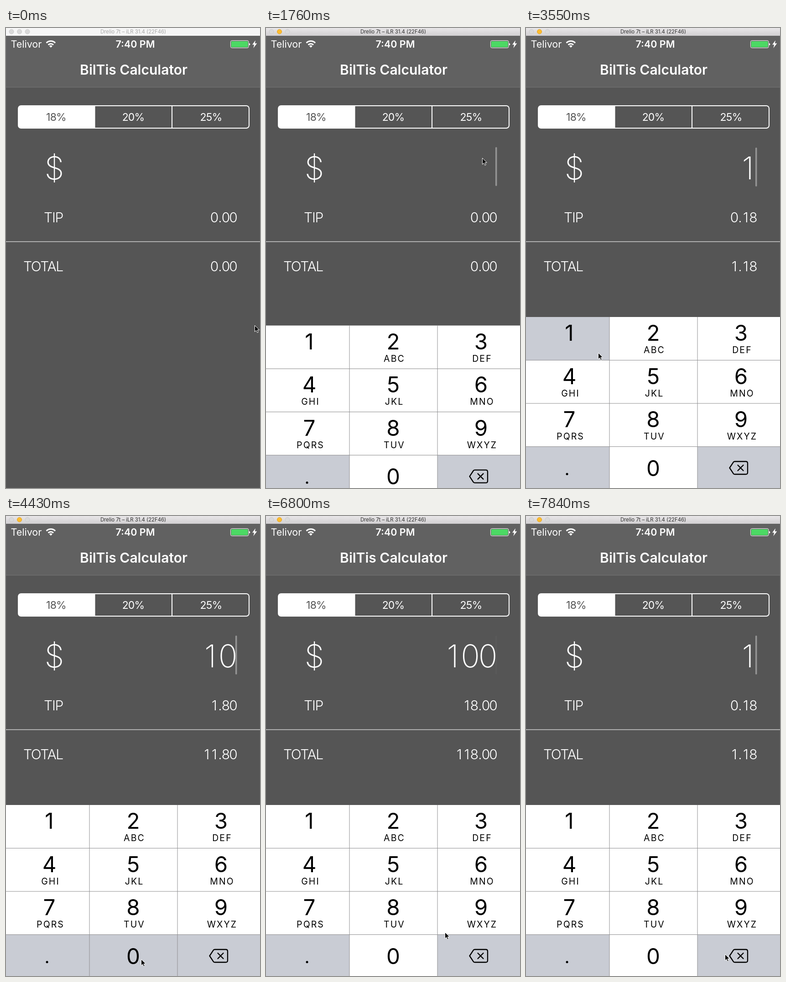
Write an HTML page that moves like this. It is 557x1006 px and loops after 8000 ms.

```html
<!DOCTYPE html>
<html lang="en">
<head>
<meta charset="utf-8">
<title>Tip calculator</title>
<style>
  html, body { margin: 0; width: 100%; height: 100%; overflow: hidden; background: #555; }
  svg { display: block; width: 100%; height: 100%; font-family: Inter, Roboto, sans-serif; }
  .mid { text-anchor: middle; }
  .end { text-anchor: end; }
  .white { fill: #fff; }
  .light { font-size: 30px; font-weight: 300; fill: #fff; }
  .label { letter-spacing: -1.3px; }
  .big { font-size: 69px; font-weight: 150; fill: #fff; }
  .digit { font-size: 47.5px; text-anchor: middle; }
  .letters { font-size: 19.5px; letter-spacing: 2.1px; text-anchor: middle; }
</style>
</head>
<body>
<svg viewBox="0 0 557 1006" preserveAspectRatio="none">
  <defs>
    <linearGradient id="chrome" x2="0" y2="1">
      <stop stop-color="#e8e6e8"/><stop offset="1" stop-color="#d1cfd1"/>
    </linearGradient>
  </defs>
  <rect width="557" height="1006" fill="#555"/>
  <rect y="17" width="557" height="112" fill="#616161"/>
  <rect y="129" width="557" height="1" fill="#757575"/>

  <rect id="bar" width="557" height="17"/>
  <g stroke-width="1">
    <circle cx="12" cy="8" r="5" fill="#d9d9d9" stroke="#cbcbcb"/>
    <circle id="amber" cx="29.5" cy="8" r="5"/>
    <circle cx="47" cy="8" r="5" fill="#d9d9d9" stroke="#cbcbcb"/>
  </g>
  <text id="window" class="mid" x="279" y="12.3" font-size="11.3">Drelio 7t – iLR 31.4 (22F46)</text>

  <g class="white">
    <text x="10.5" y="43" font-size="21.5">Telivor</text>
    <text class="mid" x="283.5" y="43" font-size="21.5" font-weight="600">7:40 PM</text>
    <text class="mid" x="280" y="101.5" font-size="30" font-weight="600">BilTis Calculator</text>
    <path d="M98.3 43l-3.4-3.6a5 5 0 0 1 6.8 0z"/>
    <path d="M92.6 36.8a8.2 8.2 0 0 1 11.4 0M88.6 32.6a13.8 13.8 0 0 1 19.4 0" fill="none" stroke="#fff" stroke-width="3"/>
    <rect x="492.5" y="27.5" width="39.5" height="16" rx="3" fill="none" stroke="#fff"/>
    <rect x="494" y="29" width="36.5" height="13" rx="1.5" fill="#4cd964"/>
    <path d="M533 33q2.4.5 2.4 2.5t-2.4 2.5zM547 27l-7 9.6h4.3l-1.9 7.4 8-10.4h-4.6z"/>
  </g>

  <rect x="27" y="170" width="506" height="49" rx="6" fill="none" stroke="#fff" stroke-width="2"/>
  <path d="M195.5 170v49H33q-6 0-6-6v-37q0-6 6-6z" fill="#fff"/>
  <path d="M364 170v49" stroke="#fff" stroke-width="2"/>
  <g class="mid" font-size="23" letter-spacing="-.8" fill="#fff">
    <text x="110" y="203" fill="#555">18%</text>
    <text x="279" y="203">20%</text>
    <text x="449.500" y="203">25%</text>
  </g>

  <text class="big end" x="127.5" y="330.5">$</text>
  <text class="big mid" id="amount" y="330.5"></text>
  <rect id="caret" x="503" width="3.5" height="85" rx="1.5" fill="#949494"/>
  <text class="light label end" x="125" y="425">TIP</text>
  <text class="light mid" id="tip" y="425"></text>
  <rect y="466.5" width="557" height="1.6" fill="#c8c8c8"/>
  <text class="light label end" x="125" y="531.5">TOTAL</text>
  <text class="light mid" id="total" y="531.5"></text>

  <g id="pad"></g>
  <path id="pointer" d="M.5.5v13.7l3.2-3 2.3 5 2.3-1-2.2-4.900h4.300z" fill="#000" stroke="#fff"/>
</svg>
<script>
const LOOP = 8000, STEP = 147.8, LEAD = 14;
const PAD_TOP = 632, ROW = 94.5;
const WHITE = '#fff', GREY = '#c9ccd4';
const $ = id => document.getElementById(id);

// Tables hold [step, value...]; the screen refreshes once per step.
const pointerPath = [
  [0, 545, 650], [7, 474, 284], [17, 474, 284], [23, 158, 710], [24, 158, 710],
  [25, 288, 973], [29, 296, 969], [35, 296, 969], [36, 317, 970], [37, 317, 970],
  [39, 330, 968], [44, 330, 968], [45, 278, 940], [46, 392, 910], [48, 436, 958]
];
const caretSteps = [
  [0, 0], [10, 1], [14, .5], [15, 0], [18, 1], [21, .4], [22, 0], [23, 1],
  [38, .5], [39, 0], [42, 1], [45, .4], [46, .06], [47, 0], [49, 1]
];
const amountSteps = [[0, ''], [24, '1'], [30, '10'], [35, '100'], [49, '10'], [52, '1']];
const pressSteps = [
  [0, ''], [23, '1'], [25, ''], [29, '0'], [31, ''], [34, '0'], [36, ''],
  [48, 'del'], [50, ''], [51, 'del'], [53, '']
];

const columns = [[0, 183, 96], [183, 193, 280], [376, 181, 472.5]];
const names = ['1', '2', '3', '4', '5', '6', '7', '8', '9', '.', '0', 'del'];
const letters = ['', 'ABC', 'DEF', 'GHI', 'JKL', 'MNO', 'PQRS', 'TUV', 'WXYZ'];
const deleteIcon =
  '<g fill="none" stroke="#000" stroke-width="2.3" stroke-linejoin="round" stroke-linecap="round">' +
  '<path d="M458 32.5h24q4 0 4 4v20q0 4-4 4h-24q-2 0-3.3-1.6l-8.2-12.400 8.200-12.400q1.300-1.600 3.300-1.600z"/>' +
  '<path d="M464.5 40.500l12 12m0-12l-12 12"/></g>';

function keyFace(name, i, x) {
  if (name === 'del') return deleteIcon;
  if (name === '.') return '<circle cx="90" cy="60" r="2.5"/>';
  const baseline = name === '0' ? 64 : 52;
  return `<text class="digit" x="${x - 1}" y="${baseline}">${name}</text>` +
    `<text class="letters" x="${x + 1.5}" y="79">${letters[i] || ''}</text>`;
}

$('pad').innerHTML = names.map((name, i) => {
  const [left, width, center] = columns[i % 3];
  return `<g transform="translate(0 ${Math.floor(i / 3) * ROW})">` +
    `<rect data-key="${name}" x="${left}" width="${width}" height="${ROW}"/>` +
    keyFace(name, i, center) + '</g>';
}).join('') +
  `<path d="M183 0v380M376 0v380M0 ${ROW}h557M0 ${2 * ROW}h557M0 ${3 * ROW}h557" stroke="#8e8e90"/>`;
const keys = [...document.querySelectorAll('[data-key]')];

const held = (table, step) => table.filter(row => row[0] <= step).pop()[1];

function along(path, step) {
  const next = path.findIndex(row => row[0] > step);
  if (next < 0) return path[path.length - 1].slice(1);
  const [s0, x0, y0] = path[next - 1], [s1, x1, y1] = path[next];
  const p = (step - s0) / (s1 - s0), e = p * p * (3 - 2 * p);
  return [x0 + (x1 - x0) * e, y0 + (y1 - y0) * e];
}

// Critically damped spring that brings the keypad up.
function padOffset(step) {
  if (step < 10) return 400;
  const w = .17 + (step - 10) * 2.29;
  return 375 * (1 + w) * Math.exp(-w);
}

// Right-aligned figures of equal pitch; the point takes half a cell.
function setFigures(id, text, right, pitch) {
  let edge = right;
  const centers = [...text].reverse().map(char => {
    const cell = char === '.' ? pitch / 2 : pitch;
    edge -= cell;
    return edge + cell / 2;
  });
  $(id).setAttribute('x', centers.reverse().join(' '));
  $(id).textContent = text;
}

function draw(step) {
  const active = step >= 8;
  $('bar').setAttribute('fill', active ? 'url(#chrome)' : '#f6f6f6');
  $('window').setAttribute('fill', active ? '#2f2f2f' : '#a8a8a8');
  $('amber').setAttribute('fill', active ? '#fdbd2e' : '#d9d9d9');
  $('amber').setAttribute('stroke', active ? '#e0a028' : '#cbcbcb');

  const amount = held(amountSteps, step);
  setFigures('amount', amount, 506, 38.6);
  setFigures('tip', (amount * .18).toFixed(2), 506.8, 16.6);
  setFigures('total', (amount * 1.18).toFixed(2), 506.8, 16.6);
  $('caret').setAttribute('y', amount ? 261.5 : 260.5);
  $('caret').setAttribute('opacity', held(caretSteps, step));

  const pressed = held(pressSteps, step);
  for (const key of keys) {
    const name = key.dataset.key;
    const dark = name === '.' || name === 'del';
    key.setAttribute('fill', dark !== (name === pressed) ? GREY : WHITE);
  }
  $('pad').setAttribute('transform', `translate(0 ${PAD_TOP + padOffset(step)})`);
  $('pointer').setAttribute('transform', `translate(${along(pointerPath, step)})`);
}

const start = performance.now();
let shown = -1;
function tick() {
  const t = (performance.now() - start) % LOOP;
  const step = Math.min(53, Math.floor((t + LEAD) / STEP));
  if (step !== shown) draw(shown = step);
  requestAnimationFrame(tick);
}
tick();
</script>
</body>
</html>
```
